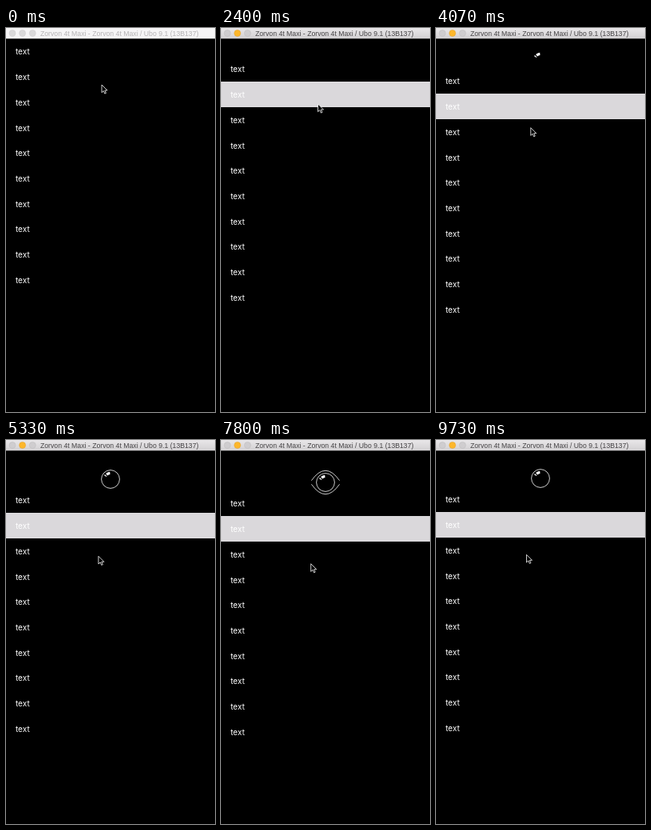
Animation of 262x480 px, one loop 9790 ms. Source, as an HTML page:

```html
<!DOCTYPE html>
<html lang="en">
<head>
<meta charset="utf-8">
<title>Pull to open eye</title>
<style>
  html, body { margin: 0; width: 100%; height: 100%; overflow: hidden; background: #000; }
  svg { display: block; width: 262px; height: 480px; }
  .row { font: 10.1px Inter, "Liberation Sans", sans-serif; fill: #fff; }
  .title { font: 8.7px "Liberation Sans", Arial, sans-serif; text-anchor: middle; fill: #b4b2b4; }
  .bar { fill: #f6f5f6; }
  .lamp { fill: #dad9da; stroke: #cccbcc; stroke-width: .5; }
  .active .title { fill: #454345; }
  .active .bar { fill: url(#chrome); }
  .active .lamp { fill: #cfcdcf; stroke: #bdbbbd; }
  .active .mid { fill: #fdb72b; stroke: #e0a02c; }
  .eye { fill: none; stroke: #fff; stroke-width: .8; }
</style>
</head>
<body>
<svg viewBox="0 0 262 480">
  <defs>
    <linearGradient id="chrome" x2="0" y2="1">
      <stop stop-color="#e9e7e9"/>
      <stop offset="1" stop-color="#d2d0d2"/>
    </linearGradient>
  </defs>
  <rect width="262" height="480"/>
  <g id="list">
    <rect id="pick" y="45" width="262" height="32" fill="#dad8db" visibility="hidden"/>
  </g>
  <g id="eye" class="eye">
    <path class="light"/>
    <path class="light"/>
    <circle id="ball" r="11.4"/>
    <path class="lid" pathLength="1" d="M-19.2 0Q0 -29.4 19.2 0"/>
    <path class="lid" pathLength="1" d="M-19.2 0Q0 29.4 19.2 0"/>
  </g>
  <g id="window">
    <rect class="bar" width="262" height="13.3"/>
    <circle class="lamp" cx="8" cy="6.5" r="4"/>
    <circle class="lamp mid" cx="20.6" cy="6.5" r="4"/>
    <circle class="lamp" cx="33.3" cy="6.5" r="4"/>
    <text class="title" x="142.2" y="9.7">Zorvon 4t Maxi - Zorvon 4t Maxi / Ubo 9.1 (13B137)</text>
  </g>
  <path id="cursor" d="M0 0V9.7L2.3 7.6 3.8 11.1 5.4 10.4 3.9 7H7Z" fill="#000" stroke="#fff" stroke-width=".8"/>
</svg>
<script>
const LOOP = 9790, FPS = 15;
const ROW = 31.7, VIEW = 466, GRAB = 52.2;
const $ = id => document.getElementById(id);
const all = cls => [...document.querySelectorAll(cls)];

const ramp = (t, a, b) => Math.min(1, Math.max(0, (t - a) / (b - a)));
const easeOut = (k, power) => 1 - (1 - k) ** power;

// up to the grab point, a quick tug, a long slow drag, then easing back
function pointer(t) {
  const tug = ramp(t, 867, 1267);
  const settle = ramp(t, 1467, 2400);
  const drag = ramp(t, 2400, 6800);
  const back = easeOut(ramp(t, 7100, 9733), 2);
  return [
    120 + 0.5 * tug + settle - 9.5 * drag ** 1.3 + 1.5 * back,
    71 - 25 * ramp(t, 0, 530) + 42 * tug + 7 * settle + 69.5 * easeOut(drag, 1.17) - 21.2 * back
  ];
}

// scroll-view resistance past the top edge
const rubber = d => VIEW * (1 - 1 / (d * 0.55 / VIEW + 1));

function arc(r, from, to) {
  const at = deg => {
    const a = deg * Math.PI / 180;
    return `${r * Math.cos(a)} ${r * Math.sin(a)}`;
  };
  return `M${at(from)}A${r} ${r} 0 0 1 ${at(to)}`;
}

for (let i = 0; i < 10; i++) {
  const text = document.createElementNS("http://www.w3.org/2000/svg", "text");
  text.setAttribute("class", "row");
  text.setAttribute("x", 11.9);
  text.setAttribute("y", 33.4 + i * ROW);
  text.textContent = "text";
  $("list").append(text);
}

const lights = all(".light"), lids = all(".lid");
lights[0].setAttribute("d", arc(7.6, 230, 265));
lights[1].setAttribute("d", arc(7.6, 211, 220));

const move = (id, x, y) => $(id).setAttribute("transform", `translate(${x} ${y})`);
const show = (el, on) => el.setAttribute("visibility", on ? "visible" : "hidden");

function draw(t) {
  const [x, y] = pointer(t);
  const held = t > 1460;
  const lag = easeOut(ramp(t, 1467, 1930), 2);
  const pull = held ? Math.round(rubber(y - GRAB) * lag) : 0;

  move("cursor", x, y);
  move("list", 0, pull);
  move("eye", 131, pull + 3);
  show($("pick"), held);
  $("window").setAttribute("class", t > 590 ? "active" : "");

  const glint = ramp(t, 2900, 3300);
  for (const l of lights) {
    l.style.strokeWidth = 3.2 * glint;
    show(l, glint > 0);
  }
  $("ball").style.opacity = ramp(t, 4400, 5150);

  // lids grow and shrink around their middle
  const open = ramp(t, 6460, 6790) - ramp(t, 7750, 8220);
  for (const l of lids) {
    l.style.strokeDasharray = `${open} 2`;
    l.style.strokeDashoffset = -(1 - open) / 2;
    show(l, open > 0);
  }
}

function tick() {
  const t = performance.now() % LOOP;
  draw(Math.floor((t + 4) * FPS / 1000) * 1000 / FPS);
  requestAnimationFrame(tick);
}
tick();
</script>
</body>
</html>
```
